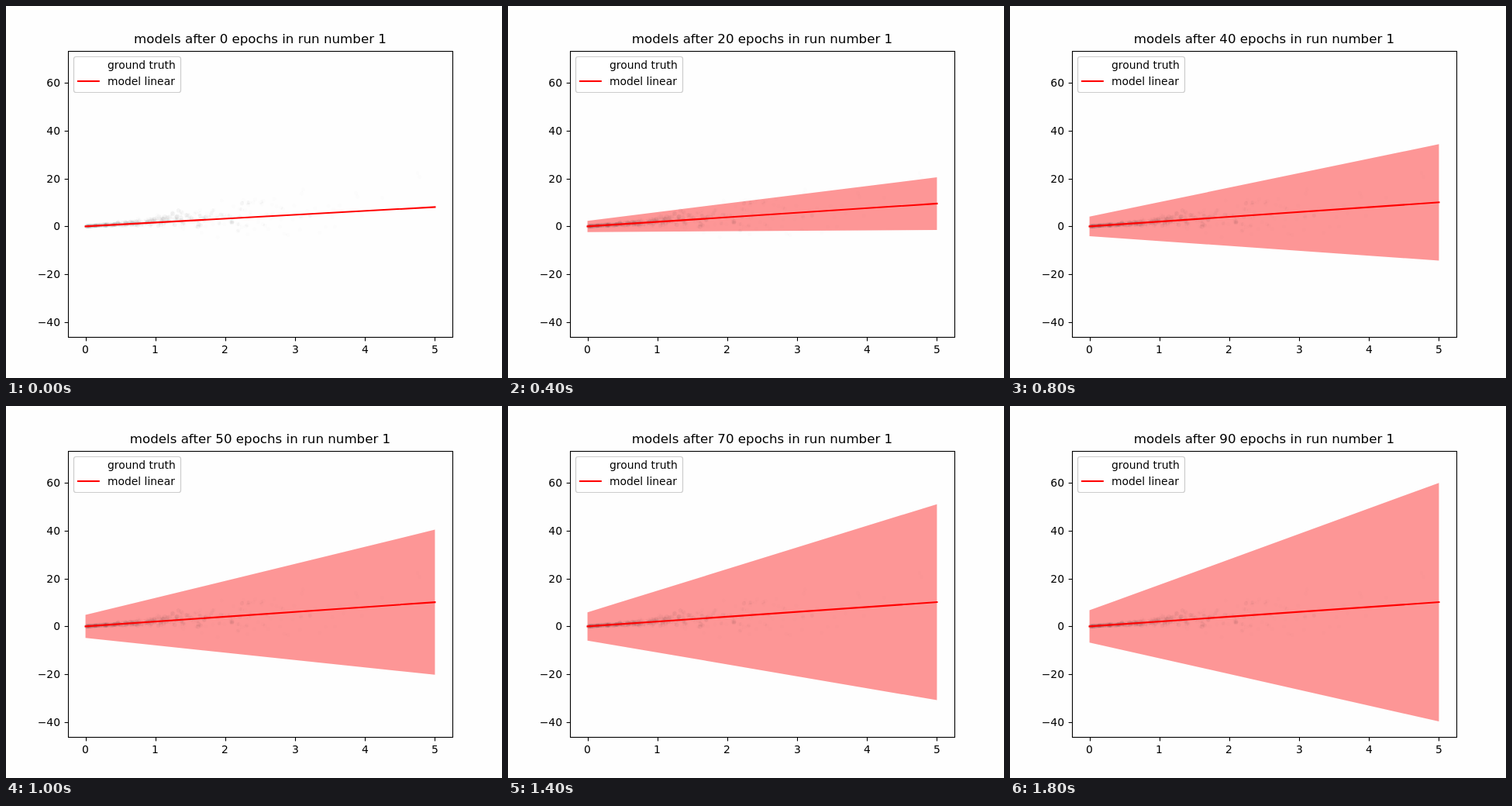
An HTML page that plays this animation: 640x480 px, repeating every 2000 ms.

```html
<!DOCTYPE html>
<html lang="en">
<head>
<meta charset="utf-8">
<title>Linear model fit</title>
<style>
  html, body { margin: 0; width: 100%; height: 100%; overflow: hidden; background: #fefefe; }
  svg { display: block; width: 640px; height: 480px; }
  text { font: 13.889px "DejaVu Sans", sans-serif; fill: #000; }
  #title { font-size: 16.667px; }
</style>
</head>
<body>
<svg id="stage" viewBox="0 0 640 480">
  <!-- Hides lone markers, so that only overlaps show -->
  <filter id="faint"><feComponentTransfer>
    <feFuncA type="linear" slope="1" intercept="-.022"/>
  </feComponentTransfer></filter>
  <rect width="640" height="480" fill="#fefefe"/>
  <path id="band" fill="#f90000" fill-opacity=".41"/>
  <g id="dots" fill-opacity=".032" filter="url(#faint)"></g>
  <path id="fit" fill="none" stroke="#f00" stroke-width="2.08" stroke-linecap="square"/>
  <rect x="80.5" y="58.5" width="496" height="369" fill="none" stroke="#000" stroke-width="1.11"/>
  <g id="axes" stroke="#000" stroke-width="1.11"></g>
  <g id="labels"></g>
  <rect x="87.5" y="65.5" width="138" height="46" rx="2.8" fill="#fff" fill-opacity=".8" stroke="#ccc" stroke-width="1.2"/>
  <path d="M93 97H119.8" stroke="#f00" stroke-width="2.08" stroke-linecap="square"/>
  <text x="131" y="81">ground truth</text>
  <text x="131" y="102">model linear</text>
  <text id="title" x="328" y="48" text-anchor="middle"></text>
</svg>
<script>
const STEP = 200, STEPS = 10, POINTS = 400;

const $ = id => document.getElementById(id);
const px = x => 102.55 + x * 90.18;
const py = y => 284.4 - y * 3.084;

// Line end, and band half-width at x = 0 and x = 5, after step i
const lineEnd = i => 10.15 - 2.05 * Math.exp(-0.46 * i ** 1.4);
const near = i => 9.1 * (1 - Math.exp(-0.15 * i));
const far = i => 3.7 + 7.55 * (i - 1) - 0.222 * (i - 1) ** 2;

function add(parent, tag, attrs, text) {
  const el = document.createElementNS("http://www.w3.org/2000/svg", tag);
  for (const k in attrs) el.setAttribute(k, attrs[k]);
  if (text !== undefined) el.textContent = text;
  parent.appendChild(el);
}

let seed = 41;
function rnd() {
  seed = (seed * 16807) % 2147483647;
  return seed / 2147483647;
}
const gauss = () => Math.sqrt(-2 * Math.log(rnd())) * Math.cos(2 * Math.PI * rnd());

// Noise around y = 2x that grows with x
function drawDots() {
  for (let i = 0; i < POINTS; i++) {
    const x = Math.abs(gauss()) * 1.6;
    const y = 2 * x + gauss() * 1.1 * x ** 1.4;
    if (x < 5) add($("dots"), "circle", { cx: px(x).toFixed(1), cy: py(y).toFixed(1), r: 3 });
  }
}

function drawAxes() {
  for (let x = 0; x <= 5; x++) {
    add($("axes"), "path", { d: `M${Math.round(px(x)) + 0.5} 427.5V432.4` });
    add($("labels"), "text", { x: Math.round(px(x) - 4.5), y: 448 }, x);
  }
  for (let y = -40; y <= 60; y += 20) {
    add($("axes"), "path", { d: `M80.5 ${Math.round(py(y)) + 0.5}H75.6` });
    add($("labels"), "text", { x: 70, y: Math.round(py(y) + 5), "text-anchor": "end" },
      y < 0 ? "\u2212" + -y : y);
  }
}

let shown = -1;
function render(time) {
  const i = Math.floor(time / STEP) % STEPS;
  if (i === shown) return;
  shown = i;
  const x0 = px(0), x5 = px(5), end = lineEnd(i), h0 = near(i), h5 = far(i);
  $("title").textContent = `models after ${i * 10} epochs in run number 1`;
  $("fit").setAttribute("d", `M${x0} ${py(0)}L${x5} ${py(end)}`);
  $("band").setAttribute("d",
    `M${x0} ${py(h0)}L${x5} ${py(end + h5)}V${py(end - h5)}L${x0} ${py(-h0)}Z`);
  $("band").style.display = i ? "" : "none";
}

drawDots();
drawAxes();
const start = performance.now();
function tick() {
  render(performance.now() - start);
  requestAnimationFrame(tick);
}
tick();
</script>
</body>
</html>
```
